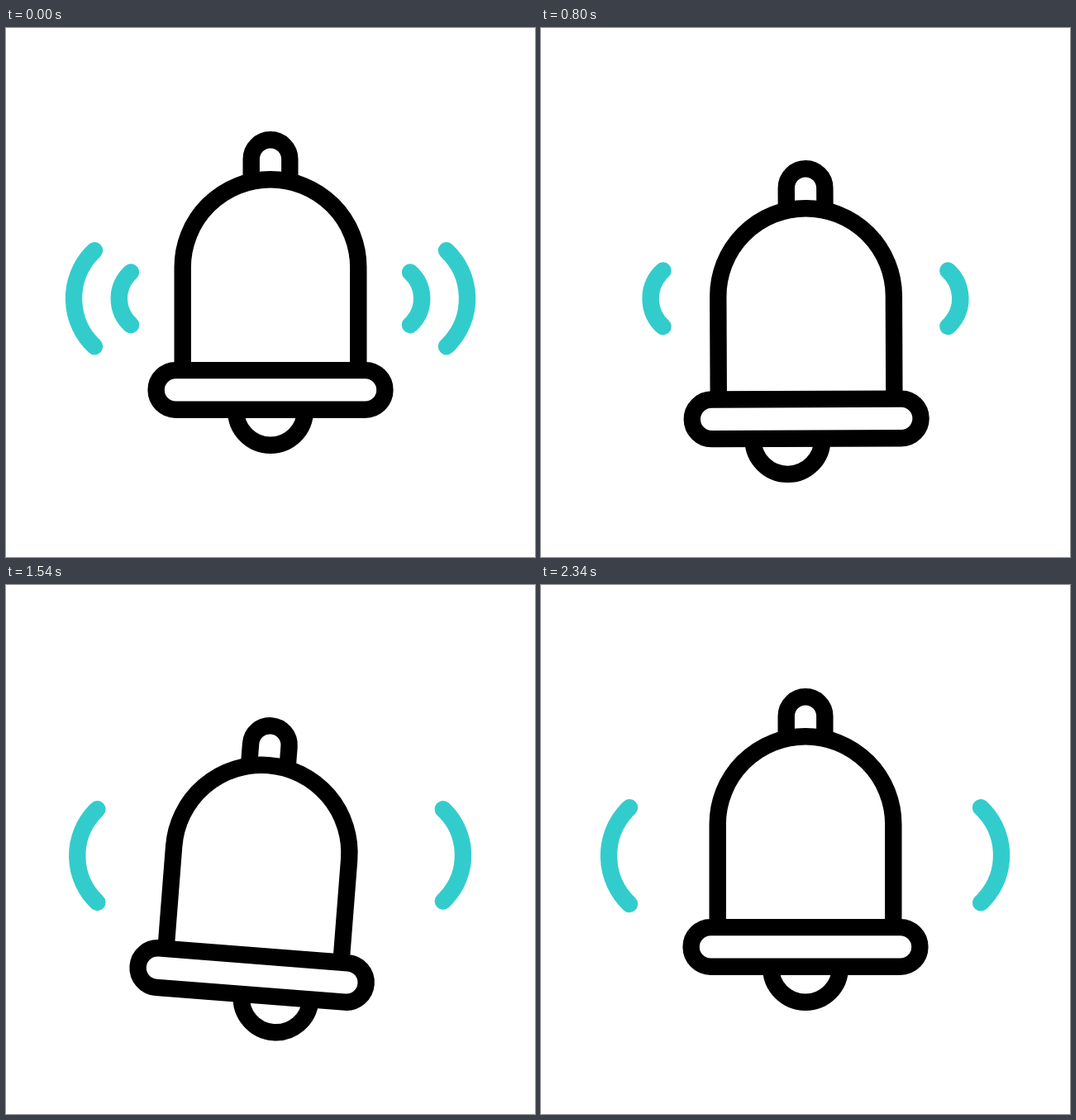
An HTML page with a canvas that plays this animation: 640 by 640 pixels, repeating every 2.4 s.

```html
<!DOCTYPE html>
<html lang="en">
<head>
<meta charset="utf-8">
<title>Ringing bell</title>
<style>
  html, body { margin: 0; width: 100%; height: 100%; overflow: hidden; background: #fff; }
  canvas { display: block; width: 100vmin; height: 100vmin; }
</style>
</head>
<body>
<canvas id="stage" width="640" height="640"></canvas>
<script>
const ctx = document.getElementById('stage').getContext('2d');
const STEP = 20, STEPS = 120;
const WAVE_STEPS = 13, WAVE_END = 117;
const MID = 320, PIVOT_Y = 150;

// Keys are [step, value], eased in and out between neighbours.
const DROP = [[0, 0], [13.8, 35], [80, 35], [103, 0]];
const TILT = [[0, 0], [13.8, 6.1], [24, -6.1], [34, 6.1], [45.7, -6.1],
              [56, 6.1], [67, -6.05], [80, 6.1], [103, 0]];
const SLIDE = [[0, 0], [10, 31], [21, -31], [31.5, 31], [42.5, -31],
               [54, 31], [64.5, -31], [77, 31], [90, -25.5], [104, 0]];

const lerp = (a, b, p) => a + (b - a) * p;
const smooth = p => p * p * (3 - 2 * p);

function valueAt(keys, step) {
  const next = keys.findIndex(key => key[0] > step);
  if (next < 0) return keys[keys.length - 1][1];
  const [t0, v0] = keys[next - 1], [t1, v1] = keys[next];
  return lerp(v0, v1, smooth((step - t0) / (t1 - t0)));
}

function strokePath(build) {
  ctx.beginPath();
  build();
  ctx.stroke();
}

// An upside-down U: half circle on top of two straight legs.
function arch(radius, centerY, footY) {
  strokePath(() => {
    ctx.moveTo(MID - radius, footY);
    ctx.arc(MID, centerY, radius, Math.PI, 0);
    ctx.lineTo(MID + radius, footY);
  });
}

function drawBell(step) {
  ctx.save();
  ctx.strokeStyle = '#000';
  ctx.lineCap = 'butt';
  ctx.translate(MID, PIVOT_Y + valueAt(DROP, step));
  ctx.rotate(valueAt(TILT, step) * Math.PI / 180);
  ctx.translate(-MID, -PIVOT_Y);
  arch(23.3, 158.6, 183);
  arch(106.3, 289.5, 414);
  strokePath(() => {
    ctx.arc(205.4, 437.9, 23.8, Math.PI / 2, Math.PI * 1.5);
    ctx.arc(434.6, 437.9, 23.8, -Math.PI / 2, Math.PI / 2);
    ctx.closePath();
  });
  strokePath(() => ctx.arc(MID + valueAt(SLIDE, step), 463, 41.8, 0, Math.PI));
  ctx.restore();
}

// Arc given by its tips (tipX, top, bottom) and its bulge away from the bell.
function drawWave(side, tipX, top, bottom, bulge) {
  const half = (bottom - top) / 2;
  const radius = (half * half + bulge * bulge) / (2 * bulge);
  const spread = Math.asin(half / radius);
  const facing = side < 0 ? Math.PI : 0;
  const centerX = MID + side * (tipX + bulge - radius);
  strokePath(() => ctx.arc(centerX, top + half, radius, facing - spread, facing + spread));
}

function drawWavePair(p, resting) {
  for (const side of [-1, 1]) {
    const drift = resting ? 0 : side;
    const endX = side > 0 && !resting ? 212.1 : 213;
    drawWave(side, lerp(169, endX, p), lerp(295.5, 269.3, p),
             lerp(359.2, 385.2 - drift * 0.8, p), lerp(14.2, 25, p));
  }
}

function drawWaves(step) {
  ctx.strokeStyle = '#33cccc';
  ctx.lineCap = 'round';
  const local = Math.min(step, WAVE_END) % WAVE_STEPS;
  if (local === 0) drawWavePair(1, step === 0);
  if (step < WAVE_END) drawWavePair(local / WAVE_STEPS, false);
}

function draw(now) {
  const step = Math.floor(now / STEP) % STEPS;
  ctx.fillStyle = '#fff';
  ctx.fillRect(0, 0, 640, 640);
  ctx.lineWidth = 20.4;
  drawWaves(step);
  drawBell(step);
}

let start = null;
function tick(now) {
  if (start === null) start = now;
  draw(now - start);
  requestAnimationFrame(tick);
}
draw(0);
requestAnimationFrame(tick);
</script>
</body>
</html>
```
